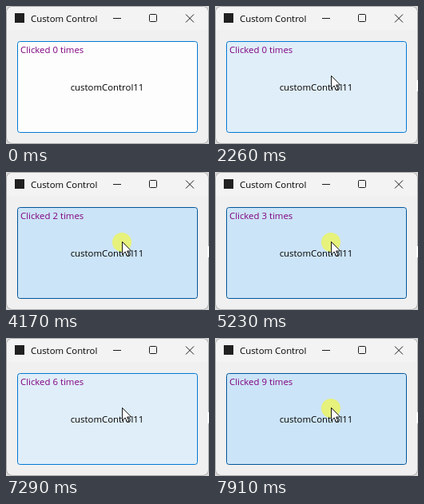
Write an HTML page that moves like this. It is 254 px wide and 173 px high and loops after 8 s.

```html
<!DOCTYPE html>
<html lang="en">
<head>
<meta charset="utf-8">
<title>Custom Control</title>
<style>
  html, body { margin: 0; width: 100%; height: 100%; overflow: hidden; background: #d6d6d6; }
  svg { display: block; }
  text { font: 11.4px "Open Sans", "Noto Sans", sans-serif; }
</style>
</head>
<body>
<svg width="254" height="173" viewBox="0 0 254 173">
  <rect x=".5" y=".5" width="253" height="172" rx="7.5" fill="#f0f0f0" stroke="#a9a9a9"/>
  <path d="M1 30V8a7 7 0 0 1 7-7H246a7 7 0 0 1 7 7V30z" fill="#f3f3f3"/>
  <rect x="11" y="9" width="12" height="12" fill="#212121"/>
  <text x="31" y="20">Custom Control</text>
  <g fill="none" stroke="#1b1b1b">
    <path d="M134 15.5h10"/>
    <rect x="179.5" y="10.5" width="9" height="9" rx="1"/>
    <path d="M225 10.5l10 10m0-10l-10 10"/>
  </g>
  <rect id="control" x="14.5" y="44.5" width="225" height="114" rx="3"/>
  <text id="counter" x="18" y="59" fill="#800080"></text>
  <text x="126.5" y="106" text-anchor="middle">customControl11</text>
  <rect id="trail" x="252" y="93" width="2" height="14" fill="#fff"/>
  <circle id="halo" cx="145" cy="88" r="12" fill="#ff0" fill-opacity=".5"/>
  <path id="cursor" d="M.5.5V16.5L4.2 13L6.7 18.5L9 17.5L6.6 12H11.7z" fill="#fff" stroke="#000" stroke-width=".9"/>
</svg>
<script>
const LOOP = 8000, ENTER = 1260, ARRIVE = 2260, STEPS = 15;
const [control, counter, trail, halo, cursor] =
  ['control', 'counter', 'trail', 'halo', 'cursor'].map(id => document.getElementById(id));

// Mouse button: [press, release] times; every release counts one click.
const clicks = [
  [2660, 2780], [3380, 3510], [4170, 4700], [5230, 5690], [6230, 6560],
  [7090, 7290], [7430, 7570], [7640, 7710], [7770, 7910], [7910, LOOP]
];

const show = (el, on) => el.setAttribute('visibility', on ? 'visible' : 'hidden');

function cursorAt(t) {
  const step = Math.floor((t - ENTER) / (ARRIVE - ENTER) * STEPS + 1.01);
  const p = Math.min(1, step / STEPS);
  return [Math.round(254 - 109 * p), Math.round(94 - 7 * Math.max(0, (p - .8) / .2))];
}

function draw(t) {
  const entered = t >= ENTER;
  const [x, y] = cursorAt(t);
  const hover = entered && x < 240;
  const pressed = clicks.some(([down, up]) => t >= down && t < up);
  const count = clicks.filter(([, up]) => t >= up).length;

  control.setAttribute('fill', pressed ? '#cce4f7' : hover ? '#e0eef9' : '#fdfdfd');
  control.setAttribute('stroke', pressed ? '#005499' : '#0078d4');
  counter.textContent = `Clicked ${count} times`;
  cursor.setAttribute('transform', `translate(${x} ${y})`);
  show(cursor, entered);
  show(trail, entered);
  show(halo, pressed);
}

const start = performance.now();
function frame() {
  draw((performance.now() - start) % LOOP);
  requestAnimationFrame(frame);
}
frame();
</script>
</body>
</html>
```
